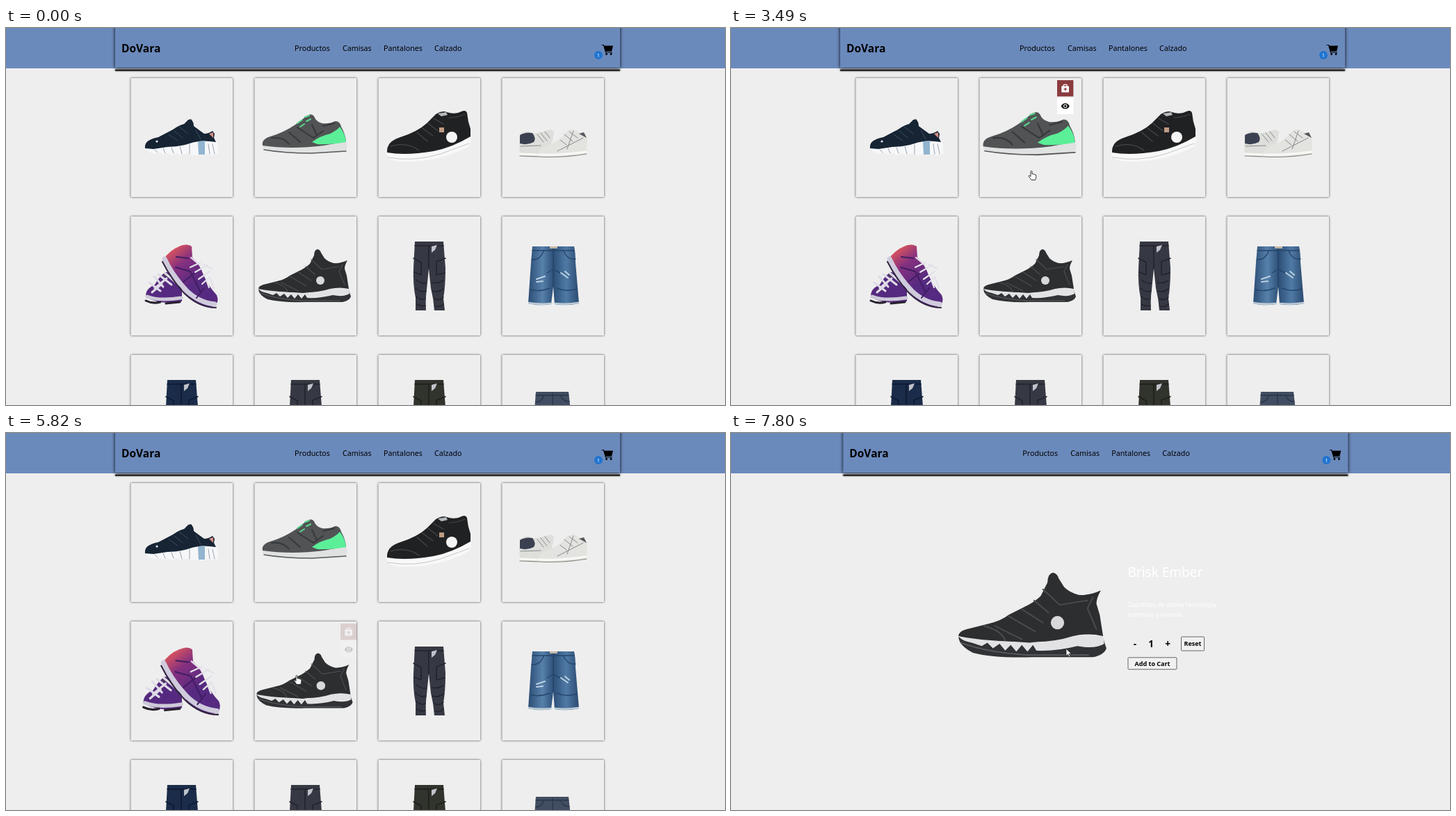
These frames come from a looping animation (1034 by 542 pixels, 8000 ms). An HTML page:

```html
<!DOCTYPE html>
<html lang="es">
<head>
<meta charset="utf-8">
<title>Tienda</title>
<style>
  html, body { margin: 0; width: 100%; height: 100%; overflow: hidden; background: #eee; }
  svg { display: block; width: 100%; height: 100%; font-family: "Noto Sans", "Open Sans", sans-serif; }
  .panel { fill: #6b8abc; filter: drop-shadow(0 0 2.5px #000); }
  .bar { fill: #0a0a0a; filter: drop-shadow(0 0 1px #000); }
  .logo { font-size: 15.5px; font-weight: 900; }
  .nav { font-size: 10.7px; font-weight: 500; }
  .card { fill: #eee; filter: drop-shadow(0 0 1.7px rgba(0, 0, 0, .75)); }
  .bold { font-weight: 700; text-anchor: middle; }
  .white { fill: #fff; }
  .button { fill: #f1f1f1; stroke: #666; }
  .line { fill: none; stroke-linecap: round; stroke-linejoin: round; }
</style>
</head>
<body>
<svg viewBox="0 0 1034 542" preserveAspectRatio="none">
  <defs>
    <linearGradient id="sunset" x1="0" y1="0" x2=".7" y2="1">
      <stop offset=".1" stop-color="#e2585a"/><stop offset=".36" stop-color="#85307f"/><stop offset=".7" stop-color="#552a80"/>
    </linearGradient>
    <linearGradient id="denim" x1="0" x2="1">
      <stop offset="0" stop-color="#2c4d74"/><stop offset=".28" stop-color="#5781ab"/><stop offset=".5" stop-color="#2d5078"/>
      <stop offset=".75" stop-color="#4f7aa5"/><stop offset="1" stop-color="#2b4a70"/>
    </linearGradient>
  </defs>
  <rect width="1034" height="58" fill="#6b8abc"/>
  <g id="header">
    <rect class="panel" x="157" y="-12" width="726" height="69"/>
    <rect class="bar" x="157" y="59.8" width="726" height="1.7"/>
    <text class="logo" x="166" y="35">DoVara</text>
    <g class="nav">
      <text x="415" y="33">Productos</text><text x="484" y="33">Camisas</text>
      <text x="543" y="33">Pantalones</text><text x="616" y="33">Calzado</text>
    </g>
    <path class="line" stroke="#000" stroke-width="1.2" d="M857 24.5H859.5L862.5 35H871.5"/>
    <path d="M860 25.5H873L871 33.5H862ZM863.5 36a1.5 1.5 0 1 0 .1 0zM870 36a1.5 1.5 0 1 0 .1 0z"/>
    <circle cx="852" cy="39" r="6" fill="#1f74d0"/>
    <text class="white" x="852" y="41.7" font-size="7.5" text-anchor="middle">1</text>
  </g>
  <g id="shop"></g>
  <g id="detail">
    <use href="#highTop" transform="translate(433.5 261.5) scale(1.6) translate(-429.5 -356)"/>
    <g class="white">
      <text x="570.5" y="207" font-size="19">Brisk Ember</text>
      <g font-size="8.8"><text x="571" y="249.8">Zapatillas de ultima tecnología,</text><text x="571" y="264">comodas y livianas</text></g>
    </g>
    <g class="bold" font-size="13.5"><text x="581" y="308">-</text><text x="604" y="307.5">1</text><text x="628" y="308">+</text></g>
    <rect class="button" x="647.5" y="293" width="33" height="20" rx="1"/>
    <rect class="button" x="571" y="322.8" width="70" height="17" rx="1"/>
    <g class="bold" font-size="9"><text x="664" y="306">Reset</text><text x="606" y="334.8">Add to Cart</text></g>
  </g>
  <g id="cursor">
    <path id="arrow" fill="#fff" stroke="#222" stroke-width=".8" d="M0 0V10.5L2.5 8.2L4.2 12L5.8 11.2L4.2 7.6H7.5Z"/>
    <path id="hand" fill="#fff" stroke="#222" stroke-width=".9" stroke-linejoin="round" d="M-1 1.2Q0-.8 1 1.2V5Q2.4 4 3.2 5.4Q4.5 4.7 5.2 6Q6.8 5.5 6.8 7.3V10Q6.5 11.5 5.6 13.5H0Q-1.2 11.5-3.6 8.6Q-4.3 7-2.7 7L-1 8.6Z"/>
  </g>
</svg>
<script>
const $ = id => document.getElementById(id);
const fill = (color, d) => `<path fill="${color}" d="${d}"/>`;
const line = (color, width, d) => `<path class="line" stroke="${color}" stroke-width="${width}" d="${d}"/>`;
const dot = (color, x, y, r) => `<circle fill="${color}" cx="${x}" cy="${y}" r="${r}"/>`;

const pants = (dx, dy, color, fold) => `<g transform="translate(${dx} ${dy})">` +
  fill(color, "M588 307H629L632 345Q632 372 629 388L631 406H616Q615 390 611 374L608 346L605 376Q603 390 604 406H589L589 388Q585 368 586 345Z") +
  line(fold, 1.6, "M588 313H629M586 331L597 337V355L587 351M632 331L619 336V355L631 352M608 313V346M590 362Q597 368 604 367M589 374Q597 381 604 378M590 386Q597 392 603 389M591 397Q597 401 603 399M613 366Q621 368 629 363M613 378Q621 381 629 375M616 389Q623 393 629 387M617 400Q624 402 629 397") +
  fill("#c0c3ca", "M612 314L620 312L617 319L612 323Z") + "</g>";

const products = [
  // running shoe, navy
  fill("#f6f7f9", "M200 172L245 168L272 160L303 162Q306 173 305 181L295 183L291 181L285 183L264 182L261 180L250 183L246 180L238 183L234 180L226 182L222 179L214 181Q203 179 200 172Z") +
  fill("#162434", "M200 173C199 164 205 160 219 157L240 146Q250 139 256 138L262 132L266 131Q270 135 270 141Q278 147 285 152Q291 152 297 148L300 152L299 158L302 164Q280 160 264 166Q250 171 232 171L212 174Z") +
  fill("#91b4cf", "M276 163L286 162V182H277Z") +
  line("#9aa2ae", 1, "M214 175L218 179M226 173L229 180M238 172L241 180M250 170L253 181M264 167V181M291 167L293 181M297 167L300 181") +
  line("#3d4c60", 1, "M234 153L247 162M242 148L254 158M249 142L262 152M273 147L280 160") +
  fill("#d88e83", "M292 152L298 150L298 158Z") + dot("#e8ebef", 217, 163, 1.6),

  // running shoe, grey and green
  fill("#e0e1e1", "M369 167L489 162Q492 170 489 177Q470 181 440 180L400 179Q372 177 369 172Z") +
  fill("#515355", "M369 169Q367 160 380 156Q400 150 416 139L433 126Q440 122 443 127Q446 135 455 137Q465 138 473 134Q480 133 482 142Q488 152 489 163L457 169Q410 175 369 169Z") +
  fill("#5bef98", "M440 164Q452 155 466 152Q476 147 480 142Q488 152 489 164Q465 168 448 167Z") +
  line("#58d78e", 2, "M419 137L426 132M430 128L436 126M423 142L429 138M432 134L438 131") +
  line("#36393c", 2, "M382 158Q399 156 407 167M407 150L423 164M419 143L442 158L456 148M440 139L447 154M456 141L472 137") +
  line("#58595b", 1.6, "M371 175Q400 180 440 180L489 177"),

  // low sneaker, black
  fill("#f8f8f8", "M547 178Q590 180 618 174L668 153Q670 164 666 170Q640 184 612 189Q585 194 560 191Q546 188 547 178Z") +
  fill("#202123", "M548 179Q547 163 567 157Q592 149 605 137L618 124Q628 118 634 121Q646 125 655 120Q661 117 663 122Q664 134 668 145V156Q641 172 615 177Q575 184 548 179Z") +
  line("#44464a", 1.2, "M553 170Q577 163 594 176M591 150L606 163M599 144L614 155M607 137L621 148M615 130L629 138M637 129Q647 129 660 124") +
  fill("#b5b8bb", "M621 123L633 121L635 125L626 127Z") +
  line("#c4c6c7", 1, "M549 186Q585 193 625 181L666 166") +
  dot("#f4f4f4", 641, 157, 8) + `<rect x="623" y="143" width="7" height="7" fill="#bf9b82"/>`,

  // white pair
  fill("#dedfdb", "M738 166L740 152Q749 146 754 150Q760 152 769 150L783 146L788 149L786 162L778 183L759 185L739 184Z") +
  fill("#3b4151", "M739 154Q747 149 757 151Q763 158 759 164Q749 169 739 166Z") +
  line("#85898b", 1, "M764 153L773 164M769 151L778 162M775 149L782 158M740 170L769 169") +
  fill("#e3e4e0", "M765 181Q767 172 781 168Q798 161 806 149Q813 144 819 147Q825 152 831 150L836 161L835 181L795 186L768 185Z") +
  line("#85898b", 1, "M797 161L806 168M803 153L815 163M810 149L822 158M816 148L807 174M830 158L793 177") +
  fill("#55585c", "M824 152L831 150L835 158Z") +
  line("#f8f8f6", 3, "M740 181L764 182M767 182Q801 183 834 178") +
  line("#85877f", 1.2, "M739 184L766 185Q800 187 835 181"),

  // purple pair
  fill("#55297f", "M201 387Q200 375 214 369Q220 358 229 351Q240 350 247 362L253 376V393Q225 399 201 387Z") +
  line("#4b4054", 4, "M228 355Q238 356 244 366") +
  line("#dedbe6", 3, "M213 357L226 372M206 366L222 378M219 354L238 369M214 374L231 360M228 352L248 369M210 380L224 368") +
  line("#cdc9d8", 5, "M203 386Q220 393 252 388") + line("#27212d", 3, "M201 392Q211 397 222 394M230 396L250 394") +
  fill("url(#sunset)", "M226 333Q236 319 249 314Q261 309 267 314L268 330Q279 340 284 355Q291 371 303 384Q308 397 296 401Q274 400 256 379L238 353Z") +
  line("#cfcbdc", 7, "M228 332Q239 356 260 378Q278 395 300 397") +
  line("#332541", 2, "M225 336Q238 362 257 382Q278 402 302 402") +
  line("#421d63", 2, "M244 344L265 350L280 380M255 365L272 352M274 388L285 374M245 329L262 331") +
  line("#e4e1ea", 2.2, "M266 330L279 341M265 344L280 337M272 351L289 341M277 361L293 350M284 340L296 346M282 368L293 358L299 374M288 362L292 373"),

  // high top
  `<g id="highTop">` +
  fill("#303235", "M363 376Q364 384 376 390Q395 395 430 394H484Q494 392 496 386L493 377Z") +
  fill("#e2e2e5", "M363 374Q390 379 427 381Q444 379 458 375L493 374L494 382Q486 387 470 384Q450 389 433 388L430 383L425 389L420 383L415 389L410 383L405 388L400 382L394 386L389 381L384 384L375 381Q364 379 363 374Z") +
  fill("#2c2e30", "M363 375Q363 371 370 369L390 364Q402 361 408 356L426 347Q433 343 437 339L443 327Q443 319 448 318Q452 319 453 323L458 331Q463 336 471 338Q480 339 491 334Q487 341 487 346L490 356L493 375Q480 372 466 375Q447 381 427 380Q388 380 363 375Z") +
  line("#4a4d50", 1.2, "M386 366Q402 370 405 379M396 366L420 378M408 357L432 371M420 351L439 363M431 343L444 354M439 333L454 347L479 343M484 340L479 350L487 369") +
  line("#5b5d60", 1, "M365 381Q390 390 425 392L480 392") +
  dot("#d8d8da", 452, 363, 6) + "</g>",

  pants(0, 0, "#363843", "#22242c"),

  // denim shorts
  fill("url(#denim)", "M757 314H817Q819 322 819 337L824 396Q806 400 789 397L787 372L784 397Q767 400 751 396L755 337Z") +
  line("#24456b", 1.4, "M757 320H817M787 317V372M756 333Q768 334 773 321M802 321Q808 334 819 332M778 352L787 347L797 352M754 376Q766 380 782 374M792 374Q806 380 821 375") +
  line("#bccbd6", 2.6, "M752 395Q768 398 784 396M790 396Q806 398 823 395") +
  line("#bad0e1", 2, "M763 361L775 357M763 365L772 364M798 352L808 359M804 350L810 355") +
  fill("#c3b7a7", "M782 314H793V317H782Z"),

  pants(-356, 199, "#1a2c49", "#0d1930"),
  pants(-178, 199, "#363843", "#22242b"),
  pants(0, 199, "#31332d", "#1d1f1a"),

  // dark jeans
  fill("#414d62", "M762 523H809L812 550H760Z") +
  line("#2c3546", 1.3, "M762 528H809M762 538Q771 537 773 529M798 529Q801 537 810 537M786 525V550")
];

const tools = `
  <g class="tools">
    <rect x="0" y="0" width="23.4" height="23.4" fill="#893b3e"/>
    <path fill="#fff" fill-rule="evenodd" d="M6.3 8.5H8.7V7Q8.7 5.8 10 5.8H13.4Q14.7 5.8 14.7 7V8.5H17V17.5H6.3ZM10 8.5H13.4V7H10ZM11.1 10.7V12.2H9.6V13.6H11.1V15.1H12.5V13.6H14V12.2H12.5V10.7Z"/>
    <rect x="0" y="25.4" width="23.4" height="23.6" fill="#fff"/>
    <path transform="translate(5.2 30.7) scale(.545)" fill-rule="evenodd" d="M12 4.5C7 4.5 2.7 7.6 1 12c1.7 4.4 6 7.5 11 7.5s9.3-3.1 11-7.5c-1.7-4.4-6-7.5-11-7.5zM12 7a5 5 0 0 1 0 10a5 5 0 0 1 0-10zM12 9a3 3 0 0 0 0 6a3 3 0 0 0 0-6z"/>
  </g>`;

const cardLeft = i => 179.5 + i % 4 * 178;
const cardTop = i => 72 + Math.floor(i / 4) * 199;
$("shop").innerHTML = products.map((art, i) =>
  `<rect class="card" x="${cardLeft(i)}" y="${cardTop(i)}" width="146.5" height="171" rx="1"/>
   <g class="product">${art}</g>${tools}`).join("");
const productNodes = document.querySelectorAll(".product");
const toolNodes = document.querySelectorAll(".tools");

// card, pointer enters, pointer leaves
const hovers = [[3, 1560, 2290], [2, 2365, 3020], [1, 3100, 4080], [0, 4150, 4700], [4, 4800, 5775], [5, 5770, 7340]];
// time, x, y
const path = [
  [70, 1019, 536], [180, 1019, 536], [240, 935, 254], [900, 935, 254], [970, 936, 255], [1110, 936, 255],
  [1300, 905, 322], [1450, 866, 263], [1560, 805, 243], [1700, 758.5, 202], [1910, 750, 202], [1980, 748, 202],
  [2290, 713, 206], [2365, 682, 208], [2590, 601, 210], [2730, 592, 212], [3020, 535, 212], [3100, 504, 210],
  [3490, 432, 205], [3690, 430, 205], [4080, 357, 202], [4150, 326, 200], [4460, 280, 196], [4530, 280, 196],
  [4700, 284, 243], [4800, 288, 271], [5280, 296, 308], [5610, 298, 309], [5770, 358, 334], [5820, 418, 348],
  [6310, 432, 352], [6510, 432, 352], [7000, 471, 318], [7270, 482, 310], [8000, 482, 310]
];
const clamp = v => Math.min(1, Math.max(0, v));
const ease = v => 1 - (1 - clamp(v)) ** 2;

function pointerAt(t) {
  const next = Math.max(1, path.findIndex(p => p[0] > t));
  const [a, b] = [path[next - 1], path[next]];
  const k = clamp((t - a[0]) / (b[0] - a[0]));
  return [a[1] + (b[1] - a[1]) * k, a[2] + (b[2] - a[2]) * k];
}

function draw(t) {
  const onDetail = t >= 7340;
  $("shop").style.display = onDetail ? "none" : "";
  $("detail").style.display = onDetail ? "" : "none";
  $("header").setAttribute("transform", `translate(${onDetail ? 4.3 : 0} 0)`);

  products.forEach((_, i) => {
    const [, enter, leave] = hovers.find(h => h[0] === i) || [i, Infinity, Infinity];
    const cx = cardLeft(i) + 73.25, cy = cardTop(i) + 85.5;
    const slide = ease((t - enter) / 230);
    const scale = 1 + .1 * (slide - ease((t - leave) / 230));
    productNodes[i].setAttribute("transform", `translate(${cx} ${cy}) scale(${scale}) translate(${-cx} ${-cy})`);
    toolNodes[i].setAttribute("transform", `translate(${cardLeft(i) + 131.5 - 20 * slide} ${cardTop(i) + 3})`);
    toolNodes[i].setAttribute("opacity", t < leave ? clamp((t - enter) / 300) : 0);
  });

  const [x, y] = pointerAt(t);
  const overCard = hovers.some(([, enter, leave]) => t >= enter && t < leave);
  $("cursor").setAttribute("transform", `translate(${x} ${y})`);
  $("cursor").style.display = t < 70 ? "none" : "";
  $("hand").style.display = overCard ? "" : "none";
  $("arrow").style.display = overCard ? "none" : "";
}

const start = performance.now();
function tick() {
  draw((performance.now() - start) % 8000);
  requestAnimationFrame(tick);
}
tick();
</script>
</body>
</html>
```
